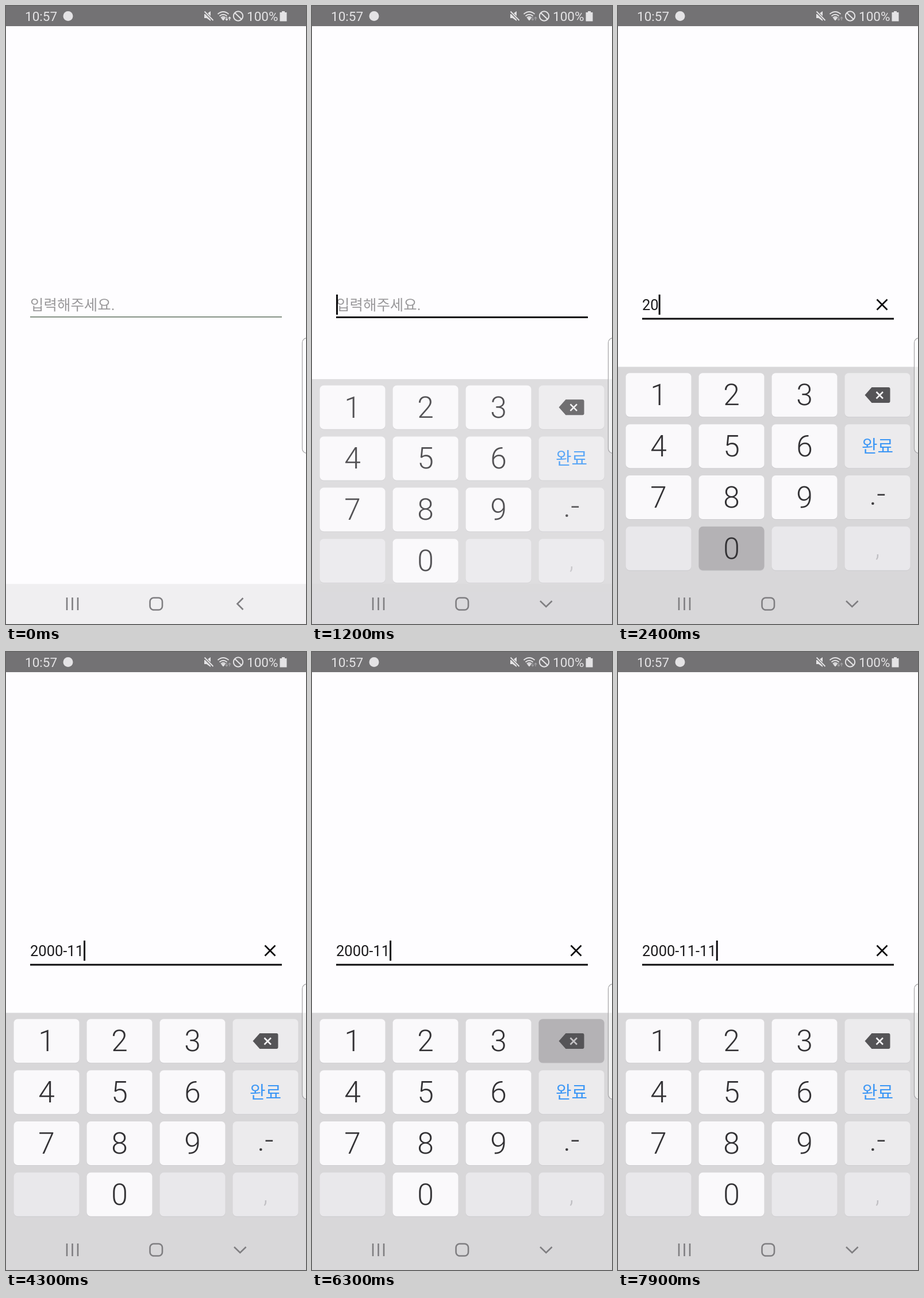
Recreate the animation shown at these times as an HTML page. Size 522 by 1073 pixels, loop 8000 ms.

```html
<!DOCTYPE html>
<html lang="ko">
<head>
<meta charset="utf-8">
<title>Date input</title>
<style>
  html, body { margin: 0; width: 100%; height: 100%; overflow: hidden; background: #fefdff; }
  svg { display: block; width: 100%; height: 100%; }
  text { font-family: Roboto, "Noto Sans CJK KR", "Noto Sans CJK JP", "Noto Sans CJK", sans-serif; }
  .status text { font-size: 22.5px; fill: #e4e3e5; }
  .field text { font-size: 25.5px; fill: #1b1a1c; }
  .field #hint { fill: #9a999b; }
  .keys text { font-size: 51.5px; font-weight: 300; fill: #333235; text-anchor: middle; }
  .keys .done { font-size: 30px; font-weight: 400; fill: #3d97f5; }
  .keys .dash { font-size: 54px; fill: #3c3b3e; }
  .keys .comma { font-size: 42px; fill: #c0bfc3; }
  .line { fill: none; stroke-linecap: butt; }
</style>
</head>
<body>
<svg viewBox="0 0 522 1073" xmlns="http://www.w3.org/2000/svg">
  <rect width="522" height="1073" fill="#fefdff"/>

  <g class="status">
    <rect width="522" height="35" fill="#737274"/>
    <text x="33" y="26">10:57</text>
    <circle cx="108" cy="17.5" r="8.5" fill="#e4e3e5"/>
    <g fill="#e4e3e5">
      <path d="M345 14h4l7-5v17l-7-5h-4z"/>
      <path class="line" d="M345 9.500l16 16" stroke="#737274" stroke-width="4.500"/>
      <path class="line" d="M345.500 9.500l15 15.500" stroke="#e4e3e5" stroke-width="1.800"/>
      <path d="M374.500 21.500q3.500-3 7 0l-3.500 4z"/>
    </g>
    <g class="line" stroke="#e4e3e5" stroke-width="1.900">
      <path d="M368.500 14q9.500-8 19 0M371.500 17.500q6.500-5.500 13 0M374 20.500q4-3.500 8 0"/>
      <circle cx="404" cy="17.500" r="8.200" stroke-width="2"/>
      <path d="M398 11.700l12 11.600" stroke-width="2"/>
    </g>
    <path id="traffic" class="line" d="M384 19v5.500m-2-2l2 2.300 2-2.300M389 25v-5.500m-2 2l2-2.300 2 2.300" stroke="#e4e3e5" stroke-width="1.400"/>
    <text x="419" y="26">100%</text>
    <path d="M480 9h5v2h3.500v15.500h-12V11h3.500z" fill="#e4e3e5"/>
  </g>

  <g class="field">
    <text id="hint" x="42" y="528">입력해주세요.</text>
    <text id="value" x="42" y="528"></text>
    <rect id="underline" x="42" width="438"/>
    <rect id="caret" y="501" width="3" height="35" fill="#0c0b0d"/>
    <path id="clear" class="line" d="M450.500 509.500l18 18m0-18l-18 18" stroke="#0c0b0d" stroke-width="2.700"/>
  </g>

  <rect y="1003.500" width="522" height="70" fill="#f0eff1"/>
  <g id="keyboard" class="keys"></g>
  <rect x="515.500" y="576.500" width="20" height="200" rx="8" fill="#fff" fill-opacity=".6" stroke="#a3a2a5" stroke-width="1.200"/>

  <g class="line" stroke="#7f7e81" stroke-width="2.600">
    <path d="M106 1027v22M115.500 1027v22M125 1027v22"/>
    <rect x="250.500" y="1027.500" width="21.500" height="21" rx="6.500"/>
    <path id="navBack" d="M412.500 1028l-10 10 10 10"/>
    <path id="navDown" d="M397 1033l10.300 10 10.300-10"/>
  </g>
</svg>

<script>
const LOOP = 8000;
const $ = id => document.getElementById(id);
const NS = "http://www.w3.org/2000/svg";

function add(parent, tag, attrs, text) {
  const el = document.createElementNS(NS, tag);
  for (const name in attrs) el.setAttribute(name, attrs[name]);
  if (text) el.textContent = text;
  return parent.appendChild(el);
}

// Keypad, row by row; "<" is backspace
const labels = ["1", "2", "3", "<", "4", "5", "6", "완료", "7", "8", "9", ".-", "", "0", "", ","];
const special = { "완료": ["done", 99], ".-": ["dash", 51], ",": ["comma", 52] };
const keys = {};

function buildKeyboard() {
  const board = $("keyboard");
  add(board, "rect", { y: 626.5, width: 522, height: 447, fill: "#d8d7d9" });
  labels.forEach((label, i) => {
    const x = 13.5 + 127 * (i % 4), y = 637.3 + 88.85 * Math.floor(i / 4);
    const fill = !label || label === "," ? "#e9e8eb" : i % 4 === 3 ? "#ecebed" : "#faf9fb";
    const box = { x, y, width: 114, height: 76, rx: 7 };
    add(board, "rect", { ...box, y: y + 1, fill: "#cccbce" });
    const face = add(board, "rect", { ...box, fill });
    if (label) keys[label] = { face, fill };
    if (label === "<") {
      add(board, "path", { d: "M429.500 675.500l12-13.500h29q3 0 3 3v21q0 3-3 3h-29z", fill: "#555457" });
      keys[label].cross = add(board, "path", { class: "line", d: "M449.500 670l11.500 11.500m0-11.500l-11.500 11.500", stroke: "#f4f3f5", "stroke-width": 2.6 });
    } else if (label) {
      const [kind, dy] = special[label] || ["digit", 56];
      const base = kind === "done" ? 774.5 : y + dy;
      add(board, "text", { class: kind, x: x + 57, y: base }, label);
    }
  });
}

// Each list holds [start ms, value]
const typed = [
  [0, ""], [1900, "2"], [2200, "20"], [2500, "200"], [2800, "2000"],
  [3900, "2000-1"], [4200, "2000-11"], [4800, "2000-11-1"], [5200, "2000-11-11"],
  [6000, "2000-11-1"], [6300, "2000-11"], [7500, "2000-11-1"], [7900, "2000-11-11"]
];
const pressed = [
  [0, ""], [1800, "2"], [2000, ""], [2100, "0"], [2200, ""], [2400, "0"], [2600, ""],
  [2700, "0"], [2900, ""], [6000, "<"], [6100, ""], [6300, "<"], [6400, ""], [7800, "1"], [7900, ""]
];
const caretOn = [
  [0, 0], [1000, 1], [1800, 0], [1900, 1], [3300, 0], [3800, 1],
  [4700, 0], [4800, 1], [5700, 0], [6000, 1], [6800, 0], [7400, 1]
];
const boardAlpha = [[0, 0], [1000, 0.15], [1100, 0.55], [1200, 0.84], [1300, 0.96], [1400, 1]];

const at = (list, t) => list.reduce((value, step) => t >= step[0] ? step[1] : value, list[0][1]);
const show = (id, on) => $(id).setAttribute("visibility", on ? "visible" : "hidden");

function render(t) {
  const text = at(typed, t), key = at(pressed, t);
  const focused = t >= 900, open = t >= 1000;

  const value = $("value");
  value.textContent = text;
  show("hint", !text);
  show("clear", text);
  show("caret", at(caretOn, t));
  $("caret").setAttribute("x", 42 + (text ? value.getComputedTextLength() : 0));

  const line = $("underline");
  line.setAttribute("y", text ? 541.5 : 539);
  line.setAttribute("height", focused ? 3 : 1.7);
  line.setAttribute("fill", focused ? "#0c0b0d" : "#718071");
  $("traffic").setAttribute("opacity", focused ? 0.4 : 1);

  const step = Math.floor(t / 100) - 11;
  const drop = step < 3 ? 61 * Math.pow(0.35, Math.max(step, -1)) : 0;
  $("keyboard").setAttribute("opacity", at(boardAlpha, t));
  $("keyboard").setAttribute("transform", `translate(0 ${drop})`);
  show("navBack", !open);
  show("navDown", open);

  for (const name in keys) {
    keys[name].face.setAttribute("fill", name === key ? "#b4b2b5" : keys[name].fill);
  }
  keys["<"].cross.setAttribute("stroke", key === "<" ? "#c4c2c5" : "#f4f3f5");
}

buildKeyboard();
const start = performance.now();
function tick() {
  render((performance.now() - start) % LOOP);
  requestAnimationFrame(tick);
}
tick();
</script>
</body>
</html>
```
